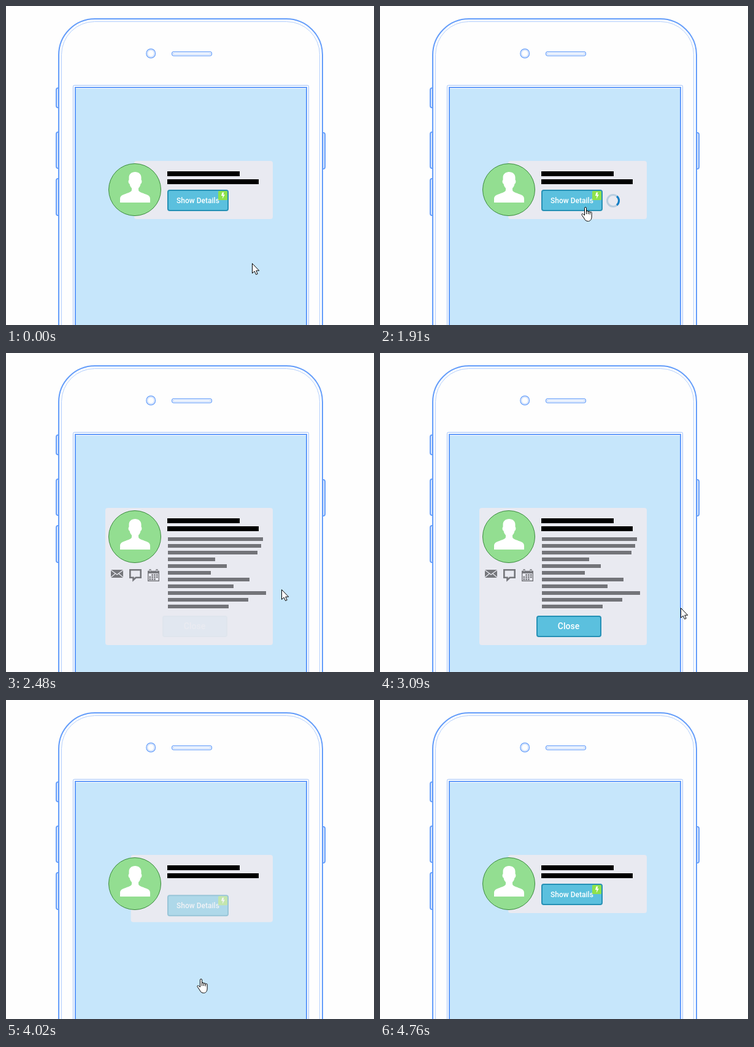
Recreate the animation shown at these times as an HTML page. Size 600 by 521 pixels, loop 6.1 s.

```html
<!DOCTYPE html>
<html lang="en">
<head>
<meta charset="utf-8">
<title>Card details</title>
<style>
  html, body { margin: 0; height: 100%; overflow: hidden; background: #fefefe; }
  svg { display: block; width: 100vw; height: 100vh; }
  text { font-family: Roboto, Arial, sans-serif; font-weight: 500; fill: #fff; text-anchor: middle; }
  .line { fill: #fefefe; stroke: #649dfa; stroke-width: 2; }
  .thin { fill: none; stroke: #b4cffc; stroke-width: 1; }
  .button { fill: #5bc0de; stroke: #2590b5; stroke-width: 2; }
  .cursor path { fill: #fff; stroke: #000; stroke-linejoin: round; }
</style>
</head>
<body>
<svg viewBox="0 0 600 521">
  <!-- phone -->
  <g class="line">
    <rect x="82" y="134" width="12" height="32" rx="3"/>
    <rect x="82" y="206" width="12" height="59" rx="3"/>
    <rect x="82" y="282" width="12" height="60" rx="3"/>
    <rect x="508" y="207" width="12" height="59" rx="3"/>
    <rect x="86" y="21" width="430" height="600" rx="59"/>
  </g>
  <g class="thin">
    <path d="M84.5 136v28M84.5 208v55M84.5 284v56M517.5 209v55"/>
    <rect x="90.5" y="25.5" width="421" height="600" rx="54"/>
    <circle cx="236.2" cy="77.5" r="5.5"/>
    <rect x="272.5" y="76.5" width="61" height="3" rx="1.5"/>
    <rect x="109.5" y="129.5" width="384" height="500" rx="2" stroke="#9fc1fb"/>
  </g>
  <g fill="none" stroke="#649dfa" stroke-width="1.2">
    <circle cx="236.2" cy="77.5" r="7.4"/>
    <rect x="270.5" y="74.5" width="65" height="7" rx="3.5"/>
  </g>
  <rect class="line" x="113" y="133" width="377" height="500"/>
  <rect x="114" y="135" width="375" height="400" fill="#c6e6fb"/>

  <!-- card -->
  <rect id="panel" y="253" rx="4" fill="#e9eaf1"/>
  <circle cx="210" cy="300" r="42.5" fill="#93de91" stroke="#3a8a3c"/>
  <g fill="#fff">
    <path id="half" d="M211 271C204 271 200.500 275 200.500 280V284C199 285 199.500 290 201.500 290.500C202 294 203.500 296 205 297.500V301C204 304 199 305 193 307.500C187.500 309.500 186 311 186 316V321H211Z"/>
    <use href="#half" transform="matrix(-1 0 0 1 421 0)"/>
  </g>
  <path d="M263 270h118v8h-118zM263 283h149v8h-149z"/>

  <g id="show">
    <rect class="button" x="264" y="301" width="98" height="33" rx="3"/>
    <text x="313" y="322" font-size="12">Show Details</text>
    <rect x="346" y="302" width="15" height="15" rx="1.5" fill="#8fe24c"/>
    <path d="M352.500 304.500h3l-1.300 3.500h2.600l-4 7 .8-5h-2.600z" fill="#fff"/>
  </g>
  <g id="spinner" fill="none" stroke-width="3">
    <circle r="9.500" stroke="#b9cee0"/>
    <path d="M6.100 -7.300A9.500 9.500 0 0 1 6.100 7.300" stroke="#147fc5"/>
  </g>
  <g id="bars" fill="#737479"></g>
  <g id="icons" fill="#75767b">
    <path d="M171 354h20v13h-20z"/>
    <path d="M171 354.500l10 7.500 10-7.500M171 366.500l7-6M191 366.500l-7-6" fill="none" stroke="#e9eaf1" stroke-width="1.200"/>
    <path d="M202.300 354.300h17.400v12.500h-8l-4.200 4v-4h-5.200z" fill="none" stroke="#75767b" stroke-width="2.600"/>
    <path d="M231.700 356.500h17.600v15.800h-17.600z" fill="none" stroke="#75767b" stroke-width="1.400"/>
    <path d="M231 356h19v4h-19zM233.500 353h3v5h-3zM244.500 353h3v5h-3z"/>
    <path d="M235 354v3M246 354v3" stroke="#e9eaf1"/>
    <path d="M237.300 362.500h11M233.500 366h15M233.500 369.500h11" stroke="#75767b" stroke-width="2.500" stroke-dasharray="2.600 1.200"/>
  </g>
  <g id="close">
    <rect class="button" x="256" y="430" width="104" height="33" rx="3"/>
    <text x="307.500" y="451" font-size="14">Close</text>
  </g>

  <g id="cursor" class="cursor">
    <path id="arrow" d="M.5 .5V16.500L4.200 13.200L6.600 18.600L9.200 17.500L6.800 12.200H11.700Z"/>
    <g id="hand" transform="translate(-6)">
      <path d="M5.500 14V2.200a1.500 1.500 0 0 1 3 0V8a1.400 1.400 0 0 1 2.900 0v.800a1.400 1.400 0 0 1 2.800 0v1a1.400 1.400 0 0 1 2.900 0V16C17.100 21 14.500 23.500 11.500 23.500C7.500 23.500 6.200 21.500 5 19L1.200 13.500C.2 11.700 2 10.600 3.500 12Z"/>
      <path d="M8.500 7.500v4.500M11.400 8.500v3.500M14.200 9.500v3"/>
    </g>
  </g>
</svg>
<script>
const LOOP = 6100;
const el = id => document.getElementById(id);
const set = (id, attrs) => {
  for (const name in attrs) el(id).setAttribute(name, attrs[name]);
};
const smooth = u => u * u * (3 - 2 * u);
const linear = u => u;
const out = u => 1 - (1 - u) ** 2;
const mix = (a, b, u) => a + (b - a) * u;
const ramp = (t, from, to) => Math.min(1, Math.max(0, (t - from) / (to - from)));
// rises over a..b and falls again over c..d
const pulse = (t, a, b, c, d) => smooth(ramp(t, a, b)) - smooth(ramp(t, c, d));

// time, x, y of the pointer tip, easing towards that point
const path = [
  [0, 401, 420], [340, 401, 420], [730, 333, 325, smooth],
  [1800, 333, 325], [1910, 333.5, 328], [2270, 388, 364], [2420, 431, 375],
  [2800, 492, 413, out], [3090, 490, 416, smooth], [3140, 490, 416],
  [3560, 317, 455, smooth], [4400, 317, 455], [4760, 446, 526, smooth], [LOOP, 446, 526]
];

function pointer(t) {
  const i = path.findIndex(p => p[0] > t);
  const [t0, x0, y0] = path[i - 1], [t1, x1, y1, ease = linear] = path[i];
  const u = ease(ramp(t, t0, t1));
  return [mix(x0, x1, u), mix(y0, y1, u)];
}

[155, 152, 146, 77, 96, 70, 133, 107, 160, 131, 99].forEach((width, i) => {
  const bar = document.createElementNS("http://www.w3.org/2000/svg", "rect");
  el("bars").append(bar);
  for (const [name, value] of Object.entries({ x: 264, y: 301 + 11 * i, width, height: 6 }))
    bar.setAttribute(name, value);
});

function draw(t) {
  const open = pulse(t, 1960, 2400, 3860, 4064);
  const left = mix(209, 162, open);
  set("panel", { x: left, width: 435 - left, height: mix(95, 224, open) });

  const gone = pulse(t, 1940, 2160, 3920, 4150);
  set("show", { opacity: 1 - gone, transform: `translate(0 ${31 * gone})` });
  set("bars", { opacity: pulse(t, 2030, 2300, 3860, 3990) });
  set("icons", { opacity: pulse(t, 2040, 2380, 3860, 3990) });
  set("close", { opacity: pulse(t, 2440, 2750, 3860, 3990) });

  const busy = pulse(t, 1200, 1450, 2020, 2320);
  set("spinner", {
    opacity: busy,
    transform: `translate(${mix(355, 380, busy)} 318) rotate(${(t - 1910) * 0.36})`
  });

  const [x, y] = pointer(t);
  const onShow = t < 2200 && y < 335 && x < 363;
  const onClose = t > 3140 && t < 4400 && x < 361;
  const hover = onShow || onClose;
  set("hand", { visibility: hover ? "visible" : "hidden" });
  set("arrow", { visibility: hover ? "hidden" : "visible" });
  set("cursor", { transform: `translate(${Math.round(x)} ${Math.round(y)})` });
  el("cursor").style.display = t < 4760 ? "" : "none";
}

const start = performance.now();
function tick() {
  draw((performance.now() - start) % LOOP);
  requestAnimationFrame(tick);
}
tick();
</script>
</body>
</html>
```
